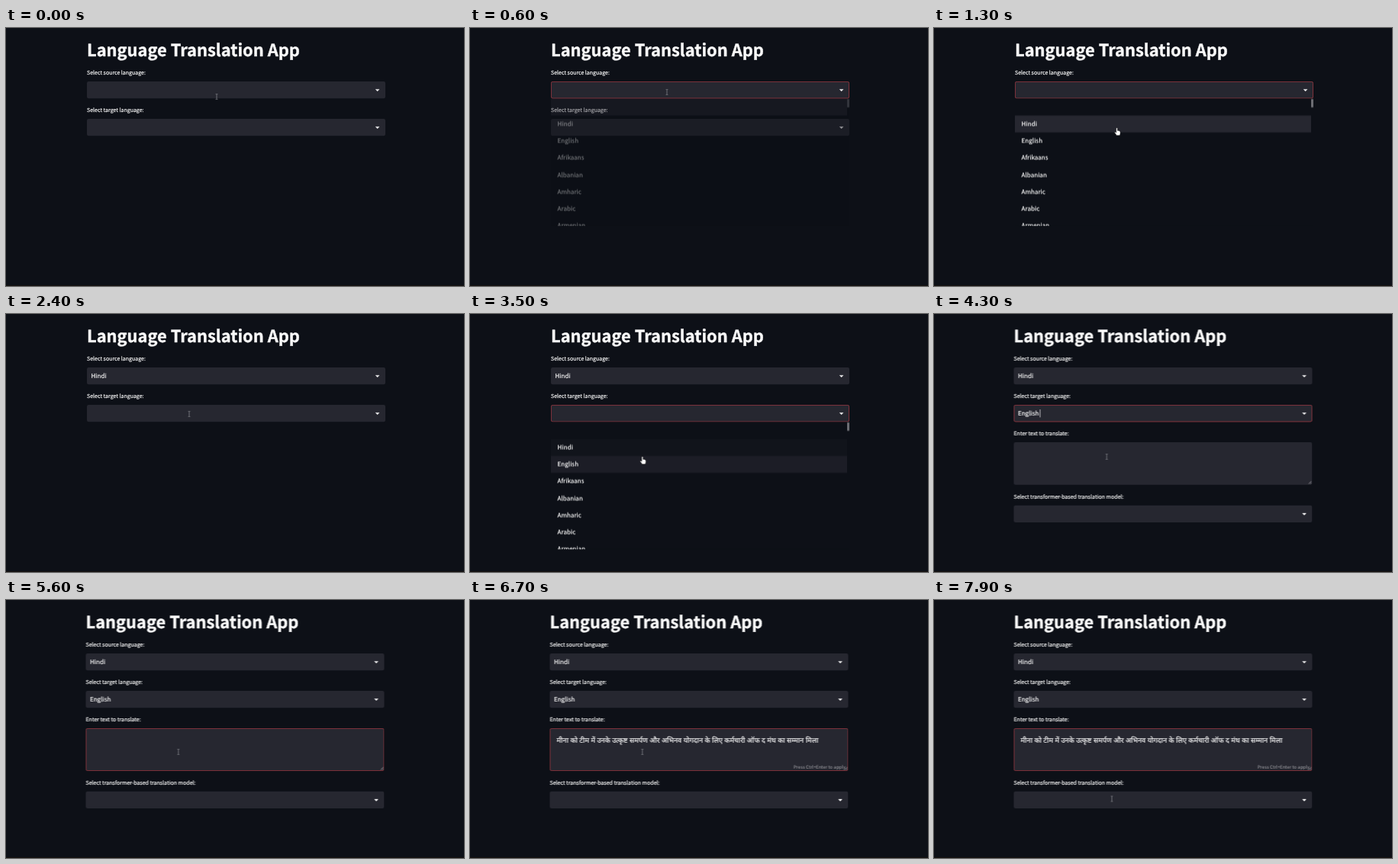
Animation, 600 px wide and 338 px high, one loop 8 s. Source, as an HTML page:

```html
<!DOCTYPE html>
<html lang="en">
<head>
<meta charset="utf-8">
<title>Language Translation App</title>
<style>
html, body { margin: 0; width: 100%; height: 100%; overflow: hidden; background: #0d1017; }
svg { display: block; width: 100vw; height: 100vh; }

text {
  fill: #fafafa;
  stroke: #fafafa;
  stroke-width: .18;
  font-family: "Noto Sans CJK JP", "Noto Sans CJK SC", "Noto Sans", sans-serif;
  font-size: 8.08px;
  text-rendering: geometricPrecision;
}
.title { font-size: 21.85px; font-weight: 700; stroke-width: .4; }
.label { font-size: 7px; }
.hint { font-size: 5.96px; fill: #a5a6ab; stroke: none; text-anchor: end; }
.hindi { font-family: "Noto Sans Devanagari", "Noto Sans", sans-serif; font-size: 9.3px; }
.box, .row { fill: #262730; }
.focus { fill: none; stroke: #b03a42; stroke-width: .7; }
.caret { fill: #fafafa; }
.beam { fill: none; stroke: #98999e; stroke-width: .65; }
.hand { fill: #fff; stroke: #111; stroke-width: .5; stroke-linejoin: round; }

/* Every part runs on the same 8 s clock. */
.fade, .cut, .move { animation: 8s linear infinite; }
.cut { animation-timing-function: step-end; }

#page { animation-name: page; }
@keyframes page { 0% { transform: none } 51.25%, 100% { transform: translateX(-1.5px) } }

#more { animation-name: more; }
@keyframes more { 0% { opacity: 0 } 51.25%, 100% { opacity: 1 } }

/* Source picker */
#focus1 { animation-name: focus1; }
@keyframes focus1 { 0%, 6.25% { opacity: 0 } 7.5%, 27.2% { opacity: 1 } 29%, 100% { opacity: 0 } }
#list1 { animation-name: list1; }
@keyframes list1 { 0%, 7% { opacity: 0 } 8.25%, 22.6% { opacity: 1 } 23.75%, 100% { opacity: 0 } }
#blank1 { animation-name: blank1; }
@keyframes blank1 { 0%, 13.4% { opacity: 1 } 15%, 100% { opacity: 0 } }
#hindi1 { animation-name: hindi1; }
@keyframes hindi1 { 0%, 13.4% { opacity: 0 } 15%, 100% { opacity: 1 } }
#value1 { animation-name: value1; }
@keyframes value1 { 0% { opacity: 0 } 23.75%, 100% { opacity: 1 } }
#caret1 { animation-name: caret1; }
@keyframes caret1 { 0% { opacity: 0 } 23.75% { opacity: 1 } 27.5%, 100% { opacity: 0 } }

/* Target picker */
#focus2 { animation-name: focus2; }
@keyframes focus2 { 0%, 31.5% { opacity: 0 } 33%, 63% { opacity: 1 } 65%, 100% { opacity: 0 } }
#list2 { animation-name: list2; }
@keyframes list2 { 0%, 32% { opacity: 0 } 34%, 48% { opacity: 1 } 49%, 100% { opacity: 0 } }
#blank2 { animation-name: blank2; }
@keyframes blank2 { 0%, 39% { opacity: 1 } 41%, 100% { opacity: 0 } }
#hindi2 { animation-name: hindi2; }
@keyframes hindi2 { 0%, 39% { opacity: 0 } 41%, 42.3% { opacity: 1 } 44.1%, 100% { opacity: 0 } }
#english2 { animation-name: english2; }
@keyframes english2 { 0%, 42.3% { opacity: 0 } 44.6%, 100% { opacity: 1 } }
#value2 { animation-name: value2; }
@keyframes value2 { 0% { opacity: 0 } 48.75%, 100% { opacity: 1 } }
#caret2 { animation-name: caret2; }
@keyframes caret2 {
  0% { opacity: 0 } 48.75% { opacity: 1 } 55% { opacity: 0 }
  61.25% { opacity: 1 } 63.5%, 100% { opacity: 0 }
}

/* Text area */
#focus3 { animation-name: focus3; }
@keyframes focus3 { 0%, 63% { opacity: 0 } 65%, 100% { opacity: 1 } }
#caret3 { animation-name: caret3; }
@keyframes caret3 { 0% { opacity: 0 } 63.5% { opacity: 1 } 69.5%, 100% { opacity: 0 } }
#pasted { animation-name: pasted; }
@keyframes pasted { 0% { opacity: 0 } 73.75%, 100% { opacity: 1 } }
#caret4 { animation-name: caret4; }
@keyframes caret4 {
  0% { opacity: 0 } 73.75% { opacity: 1 } 80% { opacity: 0 }
  86.25% { opacity: 1 } 92.5%, 100% { opacity: 0 }
}

/* Pointer */
#pointer { animation-name: pointer; }
@keyframes pointer {
  0%, 1.25% { transform: translate(276px, 90px) }
  5.5%, 8% { transform: translate(258px, 84px) }
  11.5% { transform: translate(246px, 90px) }
  15.6%, 36.9% { transform: translate(240px, 131px) }
  40% { transform: translate(232px, 167px) }
  42.8%, 57.5% { transform: translate(226.3px, 187px) }
  62.5%, 91% { transform: translate(225.8px, 199px) }
  98.4%, 100% { transform: translate(233px, 260.5px) }
}
#beam { animation-name: beam; }
@keyframes beam {
  0% { opacity: 1 } 12% { opacity: 0 } 23.75% { opacity: 1 }
  37.8% { opacity: 0 } 51.25%, 100% { opacity: 1 }
}
#hand { animation-name: hand; }
@keyframes hand {
  0% { opacity: 0 } 12% { opacity: 1 } 23.75% { opacity: 0 }
  37.8% { opacity: 1 } 51.25%, 100% { opacity: 0 }
}
</style>
</head>
<body>
<svg viewBox="0 0 600 338" preserveAspectRatio="none">
  <defs>
    <g id="picker">
      <rect class="box" width="391" height="22.2" rx="2.2"/>
      <path d="M378.3 10.4h4.6l-2.3 2.4z" fill="#fafafa" stroke="#fafafa" stroke-width=".5" stroke-linejoin="round"/>
    </g>
    <rect id="ring" class="focus" x=".4" y=".4" width="390.2" height="21.6" rx="2"/>
    <rect id="bar" class="caret" width=".65" height="10.4"/>
    <rect id="row" class="row" width="388" height="22.2"/>
    <clipPath id="panel"><rect width="391" height="166.5"/></clipPath>
    <g id="options">
      <g transform="translate(8.6 -.3)">
        <text y="36.4">Hindi</text>
        <text y="58.6">English</text>
        <text y="80.8">Afrikaans</text>
        <text y="103">Albanian</text>
        <text y="125.2">Amharic</text>
        <text y="147.4">Arabic</text>
        <text y="169.6">Armenian</text>
      </g>
      <rect x="388" y=".5" width="3" height="11" rx=".6" fill="#6c6d73"/>
    </g>
  </defs>

  <rect width="600" height="338" fill="#0d1017"/>
  <rect y="337" width="600" height="1" fill="#17120f"/>

  <g id="page" class="cut">
    <g transform="translate(106 0)">
      <text class="title" y="37.2">Language Translation App</text>

      <text class="label" y="61.4">Select source language:</text>
      <use href="#picker" y="70"/>
      <text id="value1" class="cut" x="5.4" y="84.3">Hindi</text>
      <use id="caret1" class="cut" href="#bar" x="26.4" y="76"/>
      <use id="focus1" class="fade" href="#ring" y="70"/>

      <text class="label" y="110.4">Select target language:</text>
      <use href="#picker" y="119"/>
      <text id="value2" class="cut" x="5.4" y="133.3">English</text>
      <use id="caret2" class="cut" href="#bar" x="34" y="125"/>
      <use id="focus2" class="fade" href="#ring" y="119"/>

      <g id="more" class="cut">
        <text class="label" y="159.3">Enter text to translate:</text>
        <rect class="box" y="168" width="391" height="55.8" rx="2.2"/>
        <use id="caret3" class="cut" href="#bar" x="9" y="178"/>
        <g id="pasted" class="cut">
          <text class="hindi" x="9" y="186.8" lang="hi">मीना को टीम में उनके उत्कृष्ट समर्पण और अभिनव योगदान के लिए कर्मचारी ऑफ द मंथ का सम्मान मिला</text>
          <text class="hint" x="387.6" y="220.7">Press Ctrl+Enter to apply</text>
        </g>
        <use id="caret4" class="cut" href="#bar" x="352.8" y="178"/>
        <path d="M386.4 222.4l3.4-3.4M388.4 222.4l1.4-1.4" stroke="#c4c5c9" stroke-width=".6"/>
        <rect id="focus3" class="focus fade" x=".4" y="168.4" width="390.2" height="55.2" rx="2"/>

        <text class="label" y="242.3">Select transformer-based translation model:</text>
        <use href="#picker" y="250.7"/>
      </g>

      <g transform="translate(0 92.5)">
        <g id="list1" class="fade" clip-path="url(#panel)">
          <rect width="391" height="166.5" fill="#0d1017"/>
          <use id="blank1" class="fade" href="#row"/>
          <use id="hindi1" class="fade" href="#row" y="22.2"/>
          <use href="#options"/>
        </g>
      </g>
      <g transform="translate(0 141.5)">
        <g id="list2" class="fade" clip-path="url(#panel)">
          <rect width="391" height="166.5" fill="#0d1017"/>
          <use id="blank2" class="fade" href="#row"/>
          <use id="hindi2" class="fade" href="#row" y="22.2"/>
          <use id="english2" class="fade" href="#row" y="44.4"/>
          <use href="#options"/>
        </g>
      </g>
    </g>
  </g>

  <g id="pointer" class="move">
    <path id="beam" class="beam cut" d="M-1.4 -3.4h1l.4 .4l.4 -.4h1M0 -3v6M-1.4 3.4h1l.4 -.4l.4 .4h1"/>
    <path id="hand" class="hand cut" d="M-1.3 .5Q-.4 -.8 .5 .5V3.4Q1.4 2.8 1.9 3.7Q2.8 3.2 3.2 4.2Q4 4 4.1 5V7Q4 8.4 3.2 9.8H-1Q-1.4 8.4 -3.3 6.2Q-3.5 4.9 -2.3 5.2L-1.3 6.1Z"/>
  </g>
</svg>
</body>
</html>
```
